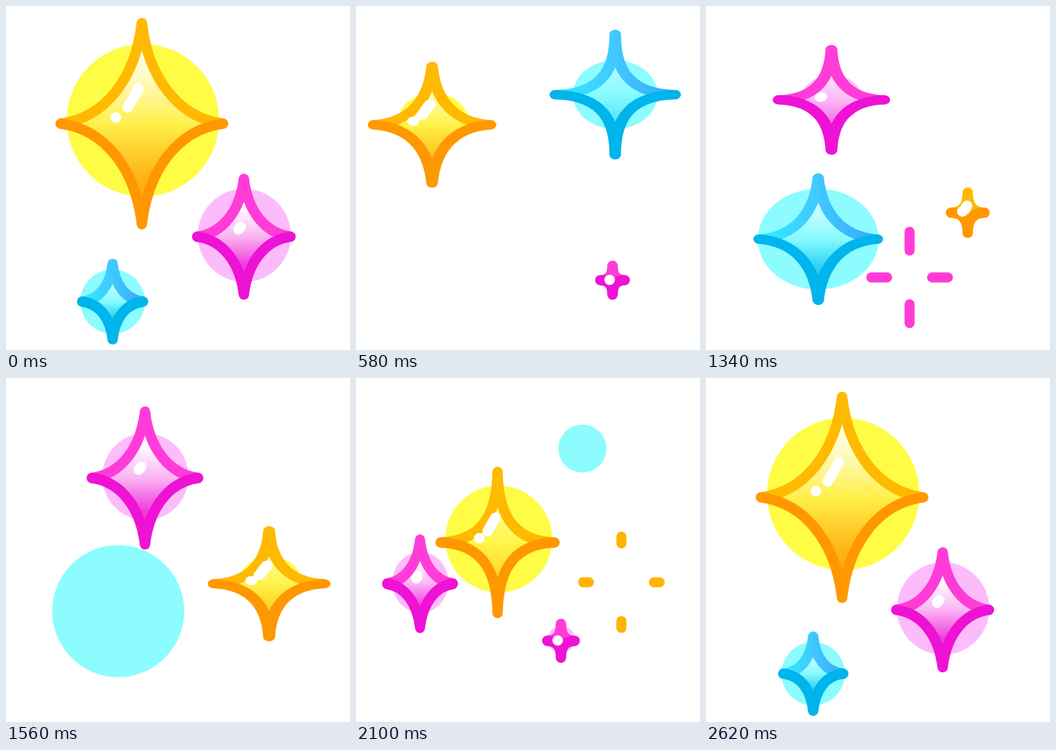
These frames come from a looping animation (512x512 px, 2640 ms). An HTML page:

```html
<!DOCTYPE html>
<html lang="en">
<head>
<meta charset="utf-8">
<title>Sparkles</title>
<style>
html, body { margin: 0; width: 100%; height: 100%; overflow: hidden; background: #fff; }
svg { display: block; width: 100vw; height: 100vh; }
</style>
</head>
<body>
<svg id="stage" viewBox="0 0 512 512"></svg>
<script>
const LOOP = 2640, STEP = 20, COLLAPSE = 140, BURST = 200;
const TALL = 1.24; // height to width of a star at rest
const NS = 'http://www.w3.org/2000/svg';
const stage = document.getElementById('stage');

const palette = {
  yellow: { top: '#ffb900', low: '#ff9800', glow: '#fffc46', dash: '#ffb400', shine: 'bar', lift: 5,
    fill: ['#fff', '#fffbd0', '#fff04a', '#ffb61a', '#ff9800'] },
  pink: { top: '#ff3cd8', low: '#ee12d4', glow: '#fcbcfb', dash: '#ff3ad6', shine: 'dot', lift: 2,
    fill: ['#fff', '#fff', '#fbb4f3', '#f03cdc', '#ee12d4'] },
  blue: { top: 'url(#blueEdge)', low: '#00b4ec', glow: '#8cfcff', dash: '#3cc3ff', lift: 0,
    fill: ['#fff', '#d8fdff', '#84faff', '#14c4f2', '#00b4ec'] }
};

const clamp = v => Math.max(0, Math.min(1, v));
const lerp = (a, b, p) => a + (b - a) * p;
const hump = p => Math.sin(Math.PI * clamp(p)) ** 2;

function set(el, attrs) {
  for (const k in attrs) el.setAttribute(k, attrs[k]);
}
function add(tag, attrs, parent) {
  const el = document.createElementNS(NS, tag);
  set(el, attrs);
  return parent.appendChild(el);
}
function show(el, on) { el.setAttribute('display', on ? 'inline' : 'none'); }

const defs = add('defs', {}, stage);
function gradient(id, colors, dir) {
  const g = add('linearGradient', { id, x1: 0, y1: 0, x2: 0, y2: 0, ...dir }, defs);
  colors.forEach((color, i) => add('stop', { offset: i / (colors.length - 1), 'stop-color': color }, g));
}
for (const name in palette) gradient(name + 'Fill', palette[name].fill, { y2: 1 });
gradient('blueEdge', ['#34ecff', '#40c8ff', '#3aa8fa'], { x2: 1 });

// A star drifts from one point to another between its birth and its burst.
// Calm stars grow without wobbling; spread is the glow's size against the star's.
function makeStar(color, { birth, burst, from, to, size, spread, calm, arch = 0, shine = palette[color].shine }) {
  const c = palette[color];
  const root = add('g', {}, stage);
  const glow = add('ellipse', { fill: c.glow }, root);
  const body = add('g', { 'stroke-width': 15.5, 'stroke-linecap': 'round', 'stroke-linejoin': 'round', fill: 'none' }, root);
  return { c, birth, burst, from, to, size, spread, calm, arch, shine, root, glow, body,
    base: add('path', { fill: c.glow }, body),
    fill: add('path', { fill: `url(#${color}Fill)` }, body),
    top: add('path', { stroke: c.top }, body),
    low: add('path', { stroke: c.low }, body),
    gleam: add('path', { stroke: '#fff' }, body),
    dashes: add('path', { stroke: c.dash, 'stroke-width': 15, 'stroke-linecap': 'round' }, root) };
}

const stars = [
  makeStar('blue', { birth: 2230, burst: 2900, from: [177, 443], to: [147, 438], size: 48, spread: 1.06, calm: true }),
  makeStar('blue', { birth: 390, burst: 1050, from: [395, 121], to: [363, 159], size: 108, spread: 1.32 }),
  makeStar('blue', { birth: 1080, burst: 1560, from: [167, 347], to: [167, 347], size: 84, spread: 1.17 }),
  makeStar('blue', { birth: 1640, burst: 2090, from: [394, 96], to: [337, 105], size: 65, spread: 0.55, shine: 'dot' }),
  makeStar('yellow', { birth: 1765, burst: 2780, from: [216, 288], to: [200, 157], size: 121, spread: 0.94, calm: true }),
  makeStar('yellow', { birth: 360, burst: 797, from: [82, 142], to: [144, 211], size: 83, spread: 0.72 }),
  makeStar('yellow', { birth: 1285, burst: 1924, from: [389, 308], to: [395, 304], size: 81, spread: 0.74 }),
  makeStar('pink', { birth: 2000, burst: 2960, from: [296, 400], to: [383, 315], size: 72, spread: 1, calm: true }),
  makeStar('pink', { birth: 515, burst: 1206, from: [390, 416], to: [303, 404], size: 54, spread: 0.62, arch: 20 }),
  makeStar('pink', { birth: 1060, burst: 1780, from: [161, 128], to: [227, 158], size: 80, spread: 0.83 }),
  makeStar('pink', { birth: 1620, burst: 2260, from: [75, 238], to: [102, 329], size: 51, spread: 0.86 })
];

// Concave arc through a vertical tip's side; young stars are pinched
function arms(w, h, pinch) {
  const ax = lerp(0.08, 0, pinch) * w, ay = lerp(0.45, 0.55, pinch) * h;
  const bx = lerp(0.45, 0.12, pinch) * w, by = lerp(0.06, 0.02, pinch) * h;
  return `M${-w} 0C${-bx} ${by} ${-ax} ${ay} 0 ${h}C${ax} ${ay} ${bx} ${by} ${w} 0`;
}

function gleamPath(kind, w, h, pinch) {
  if (kind === 'bar') {
    return `M${-0.04 * w} ${-0.35 * h}L${-0.175 * w} ${-0.16 * h}M${-0.325 * w} ${-0.06 * h}h.5`;
  }
  if (kind === 'dot') {
    const x = lerp(-0.07, -0.24, pinch) * w, y = lerp(-0.17, -0.02, pinch) * h;
    const tail = 0.045 * (1 - pinch);
    return `M${x} ${y}l${-tail * w - 0.1} ${tail * h}`;
  }
  return '';
}

function drawBody(s, w, h, squash, pinch) {
  const sy = Math.sqrt(squash), sx = 1 / sy;
  const up = arms(w, -h, pinch), down = arms(w, h, pinch), whole = up + 'Z' + down + 'Z';
  set(s.body, { transform: `scale(${sx} ${sy})` });
  set(s.base, { d: whole });
  set(s.fill, { d: whole, 'fill-opacity': 1 - 0.5 * pinch });
  set(s.top, { d: up });
  set(s.low, { d: down });
  set(s.gleam, { d: gleamPath(s.shine, w, h, pinch) });
}

function drawDashes(s, after) {
  const out = clamp(after / 75), inn = clamp((after - 40) / 160);
  const a = 57 * inn, b = 57 * out, e = 68 * inn, f = 68 * out;
  set(s.dashes, { d: `M${a} 0H${b}M${-a} 0H${-b}M0 ${e}V${f}M0 ${-e}V${-f}` });
}

function drawStar(s, clock) {
  const t = clock < s.birth ? clock + LOOP : clock;
  const after = t - s.burst;
  const alive = t > s.birth && after < BURST;
  show(s.root, alive);
  if (!alive) return;

  const u = clamp((t - s.birth) / (s.burst - s.birth));
  const x = lerp(s.from[0], s.to[0], u);
  const y = lerp(s.from[1], s.to[1], u) - s.arch * 4 * u * (1 - u);
  set(s.root, { transform: `translate(${x} ${y})` });

  const grown = s.size * (1 - (1 - u) ** (s.calm ? 3 : 4));
  const squash = s.calm ? 1 : 1 - 0.23 * hump(u / 0.8) + 0.1 * hump((u - 0.6) / 0.4);
  const pinch = clamp(1.8 * (1 - u / 0.65));

  const lag = s.calm ? 1 : Math.sin(Math.PI / 2 * clamp(1.25 * u));
  const r = grown * s.spread * lag * (1 - clamp((after - 90) / 40));
  const sy = Math.sqrt(squash);
  set(s.glow, { cx: s.c.lift / 3, cy: -s.c.lift, rx: r / sy, ry: r * sy });

  const w = grown * (1 - clamp((after + COLLAPSE) / COLLAPSE) ** 2);
  show(s.body, w > 3);
  if (w > 3) drawBody(s, w, w * TALL, squash, pinch);

  show(s.dashes, after > 10);
  if (after > 10) drawDashes(s, after);
}

let start;
function frame(now) {
  if (start === undefined) start = now;
  const t = Math.floor(((now - start) % LOOP) / STEP) * STEP;
  for (const s of stars) drawStar(s, t);
  requestAnimationFrame(frame);
}
requestAnimationFrame(frame);
</script>
</body>
</html>
```
